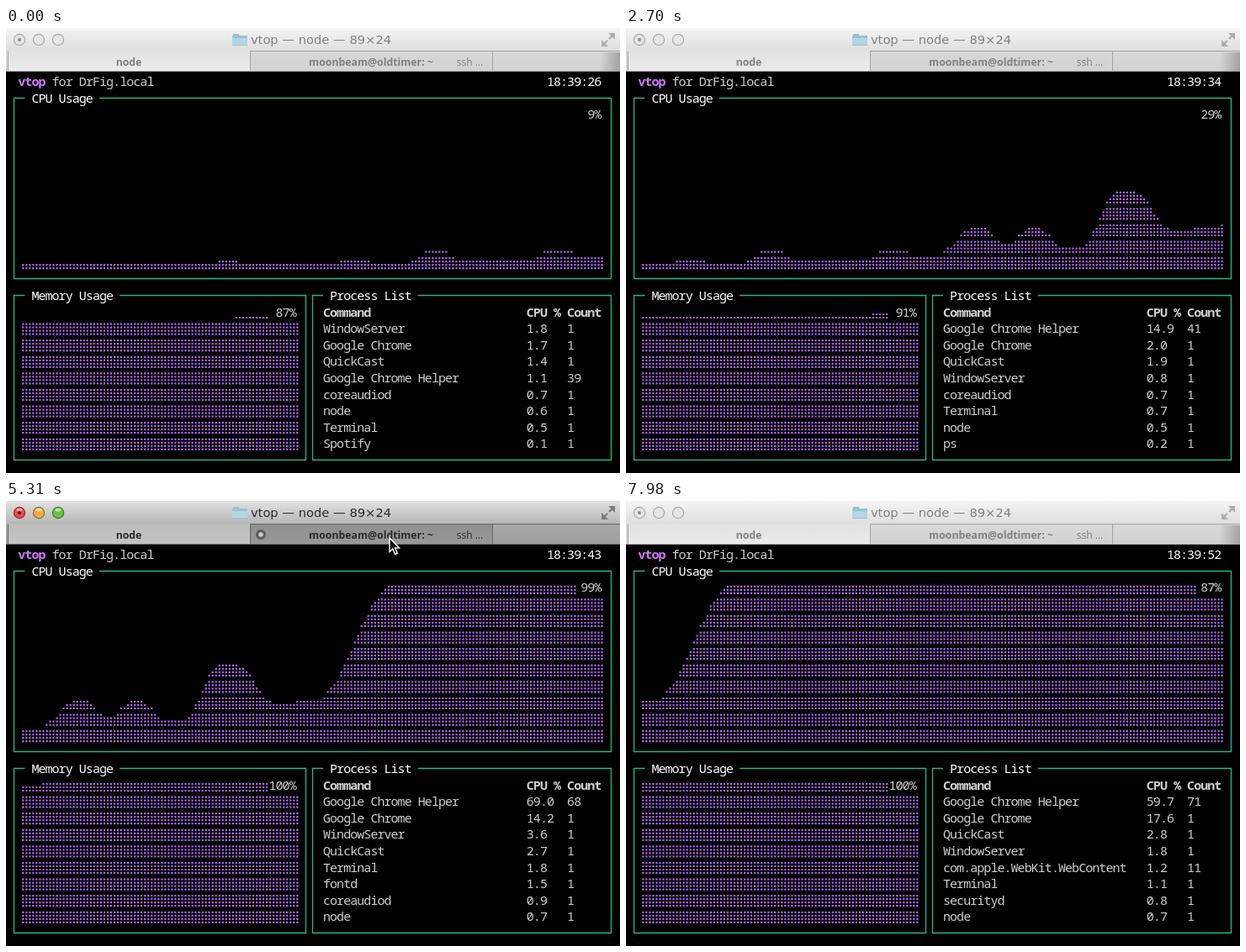
Recreate the animation shown at these times as an HTML page with a canvas. Size 730 by 530 pixels, loop 8 s.

```html
<!DOCTYPE html>
<html lang="en">
<head>
<meta charset="utf-8">
<title>vtop</title>
<style>
html, body { margin: 0; width: 100%; height: 100%; overflow: hidden; background: #000; }
canvas { display: block; }
</style>
</head>
<body>
<canvas id="stage" width="730" height="530"></canvas>
<script>
const ctx = document.getElementById('stage').getContext('2d');
const LOOP = 8000;
const CELL = 8.06, LINE = 19.6, LEFT = 6.2, TOP = 64;
const MONO = '"Noto Sans Mono", "DejaVu Sans Mono", monospace';
const TITLE = '"DejaVu Sans", sans-serif';
const TAB = '"Open Sans", sans-serif';
const PLAIN = '#d0d0d0', BRIGHT = '#ffffff', VIOLET = '#cf78fa', DOT = '#ae68ea', GREEN = '#22b88c';

const colX = c => LEFT + c * CELL;
const rowY = r => TOP + r * LINE;

// Smooth path through [time, value] points
function ease(points, t) {
  let i = 1;
  while (i < points.length - 1 && points[i][0] < t) i++;
  const [t0, a] = points[i - 1], [t1, b] = points[i];
  const p = Math.min(1, Math.max(0, (t - t0) / (t1 - t0)));
  return a + (b - a) * (1 - Math.cos(Math.PI * p)) / 2;
}

// Peaks and valleys of the CPU history, in dots
const cpuShape = [[0, 2], [55, 2], [61, 3.1], [66, 2], [90, 2], [98, 3.2], [107, 2], [112, 2],
  [122, 5.2], [130, 3], [150, 3], [155, 5.1], [161, 5], [163, 4], [170, 4], [183, 11.2],
  [191, 6.9], [200, 11], [208, 6], [213, 6.2], [225, 20], [228, 20], [241, 10], [252, 11], [276, 39]];
const cpuLevel = k => Math.round(ease(cpuShape, k));
const memLevel = k => 32 + (k >= 63) + (k >= 152) + (k >= 172);
const memPercent = t => Math.floor(Math.min(100, 87.2 + .91 * (t / 1200) ** 2));
const scrolled = t => Math.floor(.45 + t * .0312);

const processes = [
  [0, 'WindowServer 1.8 1, Google Chrome 1.7 1, QuickCast 1.4 1, Google Chrome Helper 1.1 39, ' +
    'coreaudiod 0.7 1, node 0.6 1, Terminal 0.5 1, Spotify 0.1 1'],
  [600, 'Google Chrome Helper 3.7 40, Google Chrome 3.0 1, QuickCast 1.9 1, WindowServer 1.2 1, ' +
    'coreaudiod 0.6 1, Terminal 0.6 1, node 0.4 1, mdworker 0.2 7'],
  [1950, 'Google Chrome Helper 14.9 41, Google Chrome 2.0 1, QuickCast 1.9 1, WindowServer 0.8 1, ' +
    'coreaudiod 0.7 1, Terminal 0.7 1, node 0.5 1, ps 0.2 1'],
  [3200, 'Google Chrome Helper 73.2 56, Google Chrome 13.7 1, QuickCast 2.5 1, WindowServer 2.5 1, ' +
    'fontd 1.8 1, Terminal 1.4 1, coreaudiod 0.9 1, node 0.8 1'],
  [4500, 'Google Chrome Helper 69.0 68, Google Chrome 14.2 1, WindowServer 3.6 1, QuickCast 2.7 1, ' +
    'Terminal 1.8 1, fontd 1.5 1, coreaudiod 0.9 1, node 0.7 1'],
  [5760, 'Google Chrome Helper 71.4 72, Google Chrome 13.6 1, QuickCast 2.6 1, fontd 2.4 1, ' +
    'WindowServer 2.0 1, Terminal 1.0 1, node 0.8 1, coreaudiod 0.7 1'],
  [7100, 'Google Chrome Helper 59.7 71, Google Chrome 17.6 1, QuickCast 2.8 1, WindowServer 1.8 1, ' +
    'com.apple.WebKit.WebContent 1.2 11, Terminal 1.1 1, securityd 0.8 1, node 0.7 1']
];

const ACTIVE_FROM = 4470, ACTIVE_TO = 6900;
const cursorX = [[4470, 480], [5000, 456], [5400, 456], [6000, 158], [6500, 158], [6900, 60]];
const cursorY = [[4470, 260], [5000, 44], [5400, 44], [6000, 46], [6500, 46], [6900, 260]];

function write(text, x, y, font, color, align = 'left') {
  ctx.font = font;
  ctx.fillStyle = color;
  ctx.textAlign = align;
  ctx.fillText(text, x, y);
}

function term(text, col, row, color = PLAIN, weight = 500) {
  ctx.letterSpacing = (CELL - 9) + 'px';
  write(text, colX(col), rowY(row) + 5.2, `${weight} 15px ${MONO}`, color);
  ctx.letterSpacing = '0px';
}

function fill(x, y, w, h, from, to = from) {
  const g = ctx.createLinearGradient(0, y, 0, y + h);
  g.addColorStop(0, from);
  g.addColorStop(1, to);
  ctx.fillStyle = g;
  ctx.fillRect(x, y, w, h);
}

function line(color, width, ...pts) {
  ctx.strokeStyle = color;
  ctx.lineWidth = width;
  ctx.beginPath();
  pts.forEach(([x, y]) => ctx.lineTo(x, y));
  ctx.stroke();
}

function circle(x, y, r, color, edge) {
  ctx.beginPath();
  ctx.arc(x, y, r, 0, Math.PI * 2);
  ctx.fillStyle = color;
  ctx.fill();
  if (edge) {
    ctx.strokeStyle = edge;
    ctx.lineWidth = 1.2;
    ctx.stroke();
  }
}

function panel(title, c0, r0, c1, r1) {
  const [x0, x1] = [c0, c1].map(c => Math.round(colX(c + .5)) - .5);
  const [y0, y1] = [r0, r1].map(r => Math.round(rowY(r)) - .5);
  line(GREEN, 1.3, [colX(c0 + 2), y0], [x0, y0], [x0, y1], [x1, y1], [x1, y0],
    [colX(c0 + 4 + title.length), y0]);
  term(title, c0 + 3, r0, BRIGHT);
}

// Braille-style columns; the top row stops where the label begins
function graph(levelAt, shift, count, bottomRow, topLevel, labelCol) {
  const limit = colX(labelCol) + 1.5;
  ctx.fillStyle = DOT;
  ctx.beginPath();
  for (let i = 0; i < count; i++) {
    const x = 20.3 + i * 4.025;
    const level = Math.min(levelAt(i + shift), x > limit ? topLevel : Infinity);
    for (let n = 0; n < level; n++) {
      const y = rowY(bottomRow - Math.floor(n / 4)) + 6.6 - n % 4 * 4;
      ctx.rect(x - 1.1, y - 1.1, 2.2, 2.2);
    }
  }
  ctx.fill();
}

function lights(active) {
  const colors = active ? ['#ec4a42', '#f2ac40', '#6cc048'] : Array(3).fill('#e6e6e6');
  const edges = active ? ['#94302a', '#9a6a20', '#3f7428'] : Array(3).fill('#a8a8a8');
  colors.forEach((c, i) => {
    const x = 16 + i * 23;
    circle(x, 14, 6.6, c, edges[i]);
    if (active) {
      ctx.fillStyle = 'rgba(255,255,255,.5)';
      ctx.beginPath();
      ctx.ellipse(x, 10.6, 3.6, 2, 0, 0, Math.PI * 2);
      ctx.fill();
    }
  });
  circle(16, 14, 2, active ? '#5c1510' : '#8a8a8a');
}

function folder() {
  ctx.fillStyle = '#98c0d2';
  ctx.fillRect(270, 7, 7, 4);
  ctx.fillRect(269, 9, 18, 12);
  ctx.fillStyle = '#b2d6e4';
  ctx.fillRect(269, 12, 18, 8);
}

function expandIcon(color) {
  ctx.fillStyle = color;
  for (const [x, y, s] of [[724, 6, 1], [708, 22, -1]]) {
    ctx.beginPath();
    ctx.moveTo(x, y);
    ctx.lineTo(x - 8 * s, y);
    ctx.lineTo(x, y + 8 * s);
    ctx.fill();
    line(color, 2.4, [x - 2 * s, y + 2 * s], [x - 7 * s, y + 7 * s]);
  }
}

function closeButton(x) {
  circle(x, 40, 6, '#5e5e5e');
  circle(x, 40, 2.8, '#cccccc');
}

function chrome(active, hover) {
  const edge = active ? '#666666' : '#a4a4a4';
  const ink = active ? '#2a2a2a' : '#808080';
  fill(0, 0, 730, 28, active ? '#e2e2e2' : '#f4f4f4', active ? '#b4b4b4' : '#dedede');
  fill(0, 27, 730, 25, active ? '#a8a8a8' : '#d8d8d8', active ? '#9e9e9e' : '#d2d2d2');
  fill(3, 27, 288, 25, active ? '#bcbcbc' : '#e2e2e2', active ? '#c4c4c4' : '#ebebeb');
  if (hover === 1) fill(291, 28, 287, 24, '#909090', '#989898');
  if (hover === 0) fill(3, 28, 288, 24, '#b0b0b0', '#b8b8b8');
  line(edge, 1, [730, 27.5], [290.5, 27.5], [290.5, 51.5]);
  line(edge, 1, [2.5, 28], [2.5, 52]);
  line(edge, 1, [578.5, 28], [578.5, 52]);
  line(edge, 1, [0, 51.5], [730, 51.5]);
  if (!active) {
    const g = ctx.createLinearGradient(706, 0, 730, 0);
    g.addColorStop(0, 'rgba(128,128,128,0)');
    g.addColorStop(1, 'rgba(128,128,128,.6)');
    ctx.fillStyle = g;
    ctx.fillRect(706, 29, 24, 23);
  }

  lights(active);
  folder();
  expandIcon(active ? '#7c7c7c' : '#acacac');
  write('vtop — node — 89×24', 374.5, 19, `14.7px ${TITLE}`, ink, 'center');
  write('node', 146, 45, `bold 12.3px ${TAB}`, ink, 'center');
  write('moonbeam@oldtimer: ~', 434, 45, `bold 12.3px ${TAB}`, ink, 'center');
  if (hover === 0) {
    write('…', 278, 45, `13px ${TAB}`, ink, 'center');
    closeButton(15);
  } else {
    write('ssh …', 551.5, 45, `12px ${TAB}`, ink, 'center');
  }
  if (hover === 1) closeButton(303);
}

function pointer(x, y) {
  const shape = [[0, 0], [0, 16.5], [3.8, 13], [6.6, 19.5], [9.4, 18.3], [6.6, 12], [11.6, 11.8]];
  ctx.beginPath();
  shape.forEach(([dx, dy]) => ctx.lineTo(x + dx, y + dy));
  ctx.closePath();
  ctx.fillStyle = '#0c0c0c';
  ctx.fill();
  ctx.strokeStyle = '#ffffff';
  ctx.lineWidth = 1.4;
  ctx.stroke();
}

function cpuPercent(t, level) {
  if (level < 39) return Math.floor(level * 2.5 - 1);
  return t < 5760 ? 99 : t < 7100 ? 100 : 87;
}

function processTable(t) {
  const cols = [46, 76, 82];
  ['Command', 'CPU %', 'Count'].forEach((s, i) => term(s, cols[i], 14, PLAIN, 700));
  const [, rows] = processes.filter(([from]) => from <= t).pop();
  rows.split(', ').forEach((row, r) => {
    const [, ...cells] = row.match(/^(.+) (\S+) (\S+)$/);
    cells.forEach((s, i) => term(s, cols[i], 15 + r));
  });
}

function draw(t) {
  const shift = scrolled(t);
  const active = t >= ACTIVE_FROM && t < ACTIVE_TO;
  const px = ease(cursorX, t), py = ease(cursorY, t);
  const overTabs = active && py > 27 && py < 52;
  const hover = !overTabs ? -1 : px < 291 ? 0 : px < 578 ? 1 : -1;

  fill(0, 0, 730, 530, '#000');
  chrome(active, hover);

  term('vtop', 1, 0, VIOLET, 700);
  term('for DrFig.local', 6, 0);
  term('18:39:' + Math.floor(26.08 + t * .00325), 79, 0, BRIGHT);

  panel('CPU Usage', 0, 1, 88, 12);
  panel('Memory Usage', 0, 13, 43, 23);
  panel('Process List', 44, 13, 88, 23);

  graph(cpuLevel, shift, 172, 11, 36, 83);
  graph(memLevel, shift, 82, 22, 32, 38);
  term((cpuPercent(t, cpuLevel(171 + shift)) + '%').padStart(4), 83, 2);
  term((memPercent(t) + '%').padStart(4), 38, 14);
  processTable(t);

  if (active) pointer(px, py);
}

const start = performance.now();
function tick() {
  draw((performance.now() - start) % LOOP);
  requestAnimationFrame(tick);
}
tick();
</script>
</body>
</html>
```
